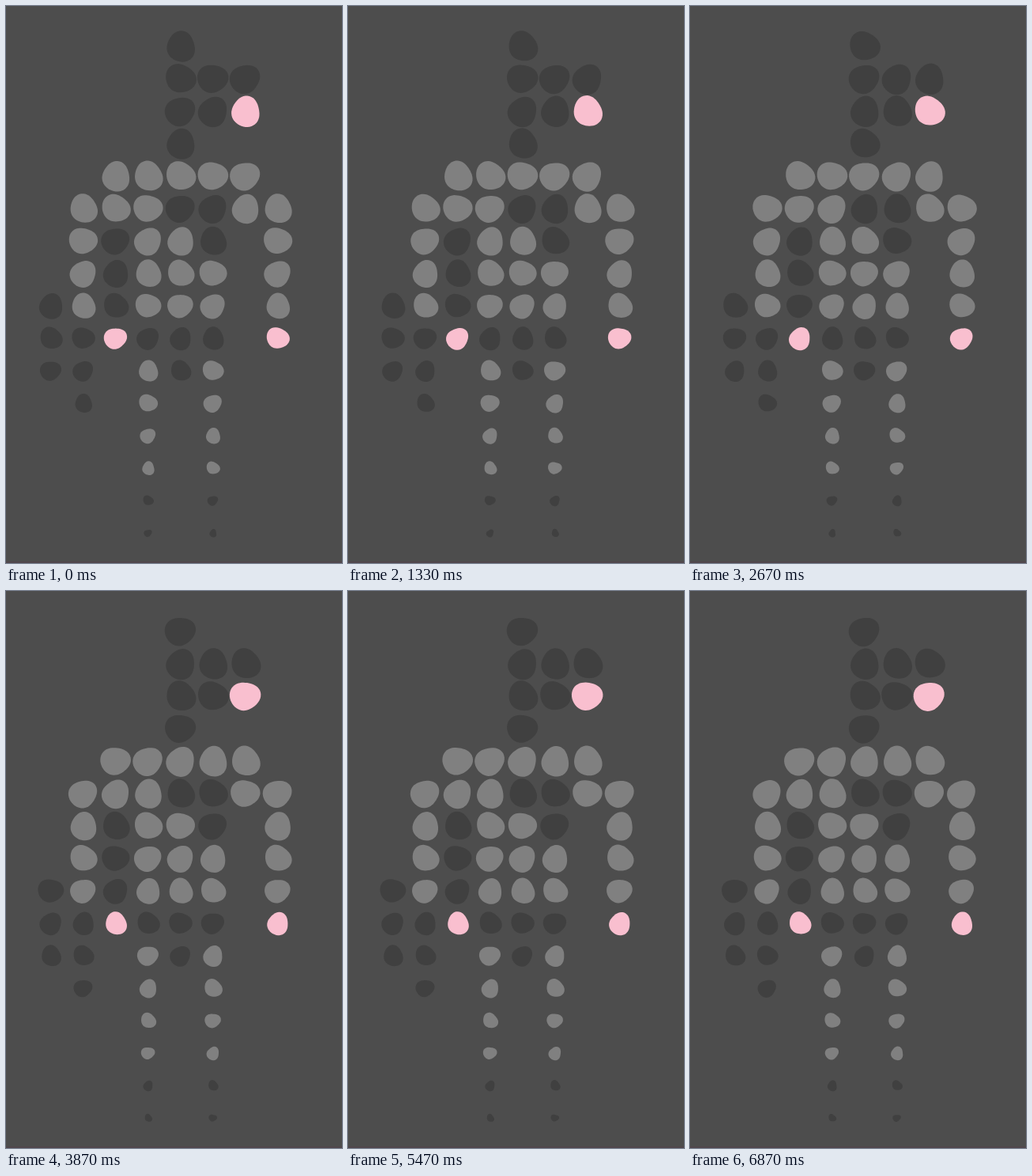
An HTML page with a canvas for the animation above (6.94 s loop, 425x704 px).

```html
<!DOCTYPE html>
<html lang="en">
<head>
<meta charset="utf-8">
<title>Wobbling dots</title>
<style>
  html, body { margin: 0; width: 100%; height: 100%; overflow: hidden; background: #4d4d4d; }
  canvas { display: block; width: 425px; height: 704px; }
</style>
</head>
<body>
<canvas id="stage" width="425" height="704"></canvas>
<script>
const ctx = document.getElementById('stage').getContext('2d');
const LOOP = 6940, STEP = 1000 / 15, LAST = 103;
const COLORS = { d: '#404040', g: '#808080', p: '#f9bfcf' };

// d = dark, g = grey, p = pink
const ROWS = [
  '....d...',
  '....ddd.',
  '....ddp.',
  '....d...',
  '..ggggg.',
  '.gggddgg',
  '.gdggd.g',
  '.gdggg.g',
  'dgdggg.g',
  'ddpddd.p',
  'dd.gdg..',
  '.d.g.g..',
  '...g.g..',
  '...g.g..',
  '...d.d..',
  '...d.d..'
];
const RADII = [18.6, 18.6, 18.6, 18.4, 18.2, 17.6, 17.1, 16.5,
               15.4, 13.8, 12.7, 11.2, 9.5, 8.1, 6.3, 4.7];
const GRID = 41, X0 = 56.8, Y0 = 51.2;
const POINTS = 48;
const rad = deg => deg * Math.PI / 180;

// Three waves travelling round the outline
function wave(a, phase) {
  return 0.7 * Math.cos(phase - 2 * a - rad(195))
       + 0.5 * Math.cos(phase - a - rad(330))
       + 0.5 * Math.cos(phase - 3 * a - rad(240));
}

function blob(x, y, r, phase, color) {
  const amp = 0.5 + 0.055 * r;
  ctx.beginPath();
  for (let i = 0; i < POINTS; i++) {
    const a = i / POINTS * 2 * Math.PI;
    const d = r + amp * wave(a, phase);
    ctx.lineTo(x + d * Math.cos(a), y + d * Math.sin(a));
  }
  ctx.closePath();
  ctx.fillStyle = color;
  ctx.fill();
}

function draw(ms) {
  const step = Math.min(LAST, Math.floor((ms % LOOP + 4) / STEP));
  const turn = 4 * step / 15;
  ctx.fillStyle = '#4d4d4d';
  ctx.fillRect(0, 0, 425, 704);
  ctx.fillStyle = '#50474c';
  ctx.fillRect(0, 702, 425, 2);
  ROWS.forEach((row, r) => [...row].forEach((kind, c) => {
    if (kind === '.') return;
    blob(X0 + GRID * c, Y0 + GRID * r, RADII[r], turn - (c - 4) - 2 * r, COLORS[kind]);
  }));
}

const start = performance.now();
function tick() {
  draw(performance.now() - start);
  requestAnimationFrame(tick);
}
tick();
</script>
</body>
</html>
```
